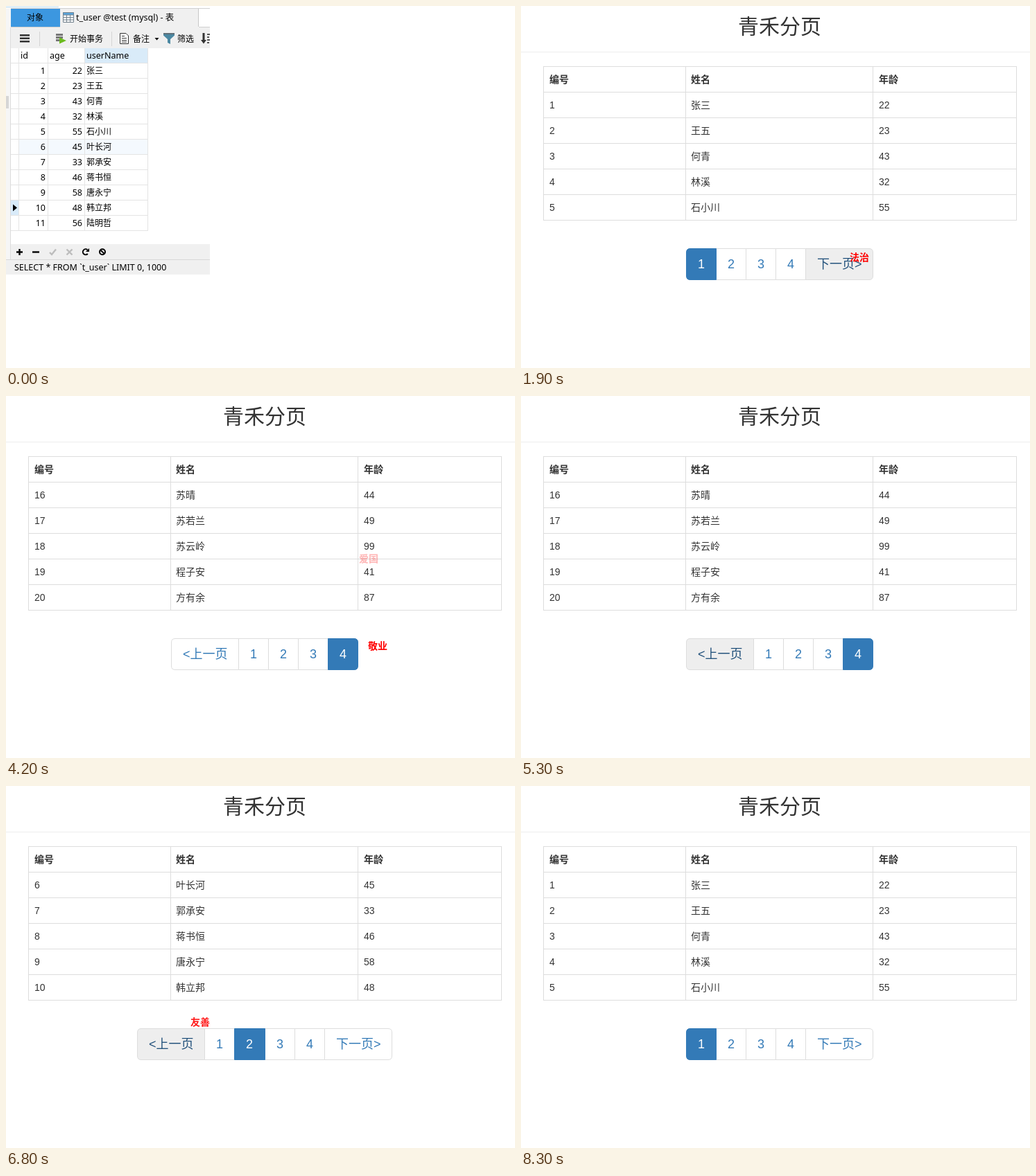
An HTML page for the animation above (8.6 s loop, 734 by 523 pixels).

```html
<!DOCTYPE html>
<html lang="zh-CN">
<head>
<meta charset="utf-8">
<style>
  html, body { margin: 0; width: 100%; height: 100%; overflow: hidden; background: #fff; }
  svg { display: block; width: 734px; height: 523px; }
  text { font-family: "Liberation Sans", "Noto Sans CJK SC", "Noto Sans CJK", sans-serif; white-space: pre; }
  #db text { font-family: "Noto Sans", "Noto Sans CJK SC", "Noto Sans CJK", sans-serif; }
</style>
</head>
<body>
<svg viewBox="0 0 734 523" xmlns="http://www.w3.org/2000/svg">
  <g id="db"></g>
  <g id="web"><g id="frame"></g><g id="rows"></g><g id="pager"></g><g id="words"></g></g>
</svg>
<script>
const LOOP = 8600, STEP = 100, WEB_START = 500;

const people = [
  ['张三', 22], ['王五', 23], ['何青', 43], ['林溪', 32], ['石小川', 55],
  ['叶长河', 45], ['郭承安', 33], ['蒋书恒', 46], ['唐永宁', 58], ['韩立邦', 48],
  ['陆明哲', 56], ['温以南', 38], ['丁小满', 27], ['秦晓舟', 61], ['纪长风', 35],
  ['苏晴', 44], ['苏若兰', 49], ['苏云岭', 99], ['程子安', 41], ['方有余', 87]
];

// start time -> page number / hovered button
const pageAt = [[0, 1], [2000, 2], [3300, 3], [4200, 4], [5600, 3], [6500, 2], [7300, 1]];
const hoverAt = [[0, ''], [1200, 'next'], [4200, ''], [4800, 'prev'], [7300, '']];

// words that rise from each click
const clicks = [
  { at: 1840, x: 474, y: 364, word: '法治' },
  { at: 3240, x: 509, y: 363, word: '爱国' },
  { at: 4140, x: 522, y: 362, word: '敬业' },
  { at: 5560, x: 273, y: 359, word: '诚信' },
  { at: 6490, x: 266, y: 359, word: '友善' },
  { at: 7200, x: 256, y: 359, word: '富强' }
];
const RISE = 180, RISE_MS = 1500, VISIBLE_MS = 1100;

const $ = id => document.getElementById(id);
const rect = (x, y, w, h, fill) =>
  `<rect x="${x}" y="${y}" width="${w}" height="${h}" fill="${fill}"/>`;
const path = (d, fill, stroke = 'none', width = 1) =>
  `<path d="${d}" fill="${fill}" stroke="${stroke}" stroke-width="${width}"/>`;
const escapeText = s => String(s).replace(/</g, '&lt;').replace(/>/g, '&gt;');
const text = (x, y, s, size, fill, more = '') =>
  `<text x="${x}" y="${y}" font-size="${size}" fill="${fill}" ${more}>${escapeText(s)}</text>`;
const valueAt = (list, t) => list.filter(([start]) => start <= t).pop()[1];

function drawToolbar() {
  const dark = '#333';
  let s = rect(7, 31, 287, 30, '#f0f0f0');
  for (const y of [41, 45.5, 50]) s += rect(20, y, 14, 2.5, dark);
  s += rect(48, 37, 1, 21, '#d4d4d4') + rect(152, 37, 1, 21, '#d4d4d4');
  // transaction
  for (const y of [40, 44, 48]) s += rect(72, y, 10, 3, '#777');
  s += path('M77 45.5L87 50L77 54.5Z', '#6cbb1f');
  s += text(92, 52, '开始事务', 12, '#000');
  // note
  s += path('M164.5 39.5H173L176.5 43V54.5H164.5Z', '#fff', dark);
  s += path('M167 43.5H171M167 46.5H174M167 49.5H174M167 52H174', 'none', dark);
  s += text(183, 52, '备注', 12, '#000');
  s += path('M214.5 46H220.5L217.5 49.5Z', '#000');
  // filter
  s += path('M227 39.5H243V42.5L237 48V55L233 53V48L227 42.5Z', '#4b88a2');
  s += rect(227, 39, 16, 2, '#5f6f78');
  s += text(247, 52, '筛选', 12, '#000');
  // sort
  s += path('M283.5 39H286.5V49H289L285 54.5L281 49H283.5Z', dark);
  for (let i = 0; i < 4; i++) s += rect(290, 40 + i * 4, 4 - i % 2, 2, '#555');
  return s;
}

function drawGrid() {
  const line = '#e4e4e4', pale = '#d9ebf9';
  let s = rect(7, 61, 287, 283, '#fff') + rect(114, 61, 90, 21, pale);
  s += rect(19, 193, 185, 21, '#f4f9fe') + rect(7, 281, 11, 21, pale);
  for (let i = 0; i < 12; i++) s += rect(7, 82 + i * 22, 198, 1, line);
  for (const x of [18, 60, 113, 204]) s += rect(x, 61, 1, 264, line);
  s += text(21, 76, 'id', 12.5, '#000') + text(63, 76, 'age', 12.5, '#000') +
    text(116, 76, 'userName', 12.5, '#000');
  const right = 'text-anchor="end"';
  people.slice(0, 11).forEach(([name, age], i) => {
    const y = 98 + i * 22;
    s += text(57, y, i + 1, 12.5, '#000', right) + text(110, y, age, 12.5, '#000', right) +
      text(116, y, name, 12, '#000');
  });
  return s + path('M10 286.5L16 291.5L10 296.5Z', '#000');
}

function drawStatus() {
  const off = '#bdbdbd';
  let s = rect(7, 344, 287, 22, '#f0f0f0') + rect(0, 366, 294, 22, '#f0f0f0') +
    rect(0, 366, 294, 1, '#d8d8d8');
  s += path('M15 355.5H24M19.5 351V360', 'none', '#000', 2.4);
  s += path('M38 355.5H48', 'none', '#000', 2.4);
  s += path('M63 356L66 359L72 351.5', 'none', off, 2.4);
  s += path('M87.5 351.5L95.5 359.5M95.5 351.5L87.5 359.5', 'none', off, 2.4);
  s += path('M117.8 358A4 4 0 1 1 117.5 352.3', 'none', '#000', 2);
  s += path('M120 350V355H115Z', '#000');
  s += '<circle cx="139" cy="355.2" r="4" fill="none" stroke="#000" stroke-width="2"/>';
  s += path('M136 352.5L142 358', 'none', '#000', 2);
  return s + text(12, 382, 'SELECT * FROM `t_user` LIMIT 0, 1000', 12.5, '#000');
}

function drawDb() {
  let s = rect(0, 3, 7, 385, '#f6f6f6') + rect(0, 130, 4, 18, '#d6d6d6');
  s += rect(0, 1, 76, 1, '#b4d8ef') + rect(7, 3, 287, 1, '#d0d0d0');
  s += rect(7, 4, 71, 26, '#3c97e0') + rect(78, 4, 199, 27, '#f0f0f0');
  s += rect(277, 4, 1, 26, '#c8c8c8') + rect(278, 30, 16, 1, '#d0d0d0') +
    rect(7, 30, 71, 1, '#d0d0d0');
  s += text(30, 21, '对象', 12, '#000');
  s += rect(82, 9, 16, 15, '#fff') + rect(82, 9, 16, 4, '#5aa5dc');
  s += path('M82.5 9.5H97.5V23.5H82.5ZM82.5 13H97.5M82.5 16.5H97.5M82.5 20H97.5M87.5 13V23.5M92.5 13V23.5',
    'none', '#71808c');
  s += text(101, 21, 't_user @test (mysql) - 表', 12.5, '#000');
  return s + drawToolbar() + drawGrid() + drawStatus() + rect(6, 31, 1, 335, '#dcdcdc');
}

const columns = [41, 245, 516];

function drawFrame() {
  let s = text(313, 40, '青禾分页', 30, '#333') + rect(0, 66, 734, 1, '#eee');
  for (let i = 0; i < 7; i++) s += rect(32, 87 + i * 37, 683, 1, '#ddd');
  for (const x of [32, 237, 507, 714]) s += rect(x, 87, 1, 223, '#ddd');
  ['编号', '姓名', '年龄'].forEach((label, i) => {
    s += text(columns[i], 111, label, 14, '#333', 'font-weight="bold"');
  });
  return s;
}

function drawRows(page) {
  const first = (page - 1) * 5;
  return people.slice(first, first + 5).map(([name, age], i) =>
    [first + i + 1, name, age].map((v, c) => text(columns[c], 148 + i * 37, v, 14, '#333')).join('')
  ).join('');
}

function buttonPath(l, r, first, last) {
  const a = first ? 5.5 : 0, b = last ? 5.5 : 0, top = 350.5, bottom = 395.5;
  l += 0.5; r -= 0.5;
  return `M${l + a} ${top}H${r - b}Q${r} ${top} ${r} ${top + b}V${bottom - b}` +
    `Q${r} ${bottom} ${r - b} ${bottom}H${l + a}Q${l} ${bottom} ${l} ${bottom - a}` +
    `V${top + a}Q${l} ${top} ${l + a} ${top}Z`;
}

function drawPager(page, hover) {
  const items = [1, 2, 3, 4].map(n => ({ id: n, label: n, w: 44.01 }));
  if (page > 1) items.unshift({ id: 'prev', label: '<上一页', w: 98.51 });
  if (page < 4) items.push({ id: 'next', label: '下一页>', w: 98.51 });
  const total = items.reduce((sum, it) => sum + it.w - 1, 1);
  let x = 373 - total / 2, plain = '', active = '';
  items.forEach((it, i) => {
    const l = Math.round(x), r = Math.round(x + it.w);
    const on = it.id === page, over = it.id === hover;
    const fill = on ? '#337ab7' : over ? '#eee' : '#fff';
    const ink = on ? '#fff' : over ? '#23527c' : '#337ab7';
    const s = path(buttonPath(l, r, i === 0, i === items.length - 1), fill, on ? fill : '#ddd') +
      text(l + 17, 379, it.label, 18, ink);
    if (on) active = s; else plain += s;
    x += it.w - 1;
  });
  return plain + active;
}

function moveWords(t) {
  clicks.forEach((c, i) => {
    const age = t - c.at, el = $('words').children[i];
    const shown = age >= 0 && age < VISIBLE_MS;
    el.style.display = shown ? '' : 'none';
    if (!shown) return;
    const swing = 0.5 - Math.cos(Math.PI * age / RISE_MS) / 2;
    el.setAttribute('y', c.y + 5 - RISE * swing);
    el.setAttribute('opacity', 1 - swing);
  });
}

let lastKey = '';
function update(time) {
  const t = Math.floor(time % LOOP / STEP) * STEP;
  const web = t >= WEB_START;
  $('db').style.display = web ? 'none' : '';
  $('web').style.display = web ? '' : 'none';
  const page = valueAt(pageAt, t), hover = valueAt(hoverAt, t), key = page + hover;
  if (key !== lastKey) {
    $('rows').innerHTML = drawRows(page);
    $('pager').innerHTML = drawPager(page, hover);
    lastKey = key;
  }
  moveWords(t);
}

$('db').innerHTML = drawDb();
$('frame').innerHTML = drawFrame();
$('words').innerHTML = clicks.map(c =>
  text(c.x, c.y, c.word, 14, '#f00', 'font-weight="bold"')).join('');

const start = performance.now();
function tick() {
  update(performance.now() - start);
  requestAnimationFrame(tick);
}
tick();
</script>
</body>
</html>
```
